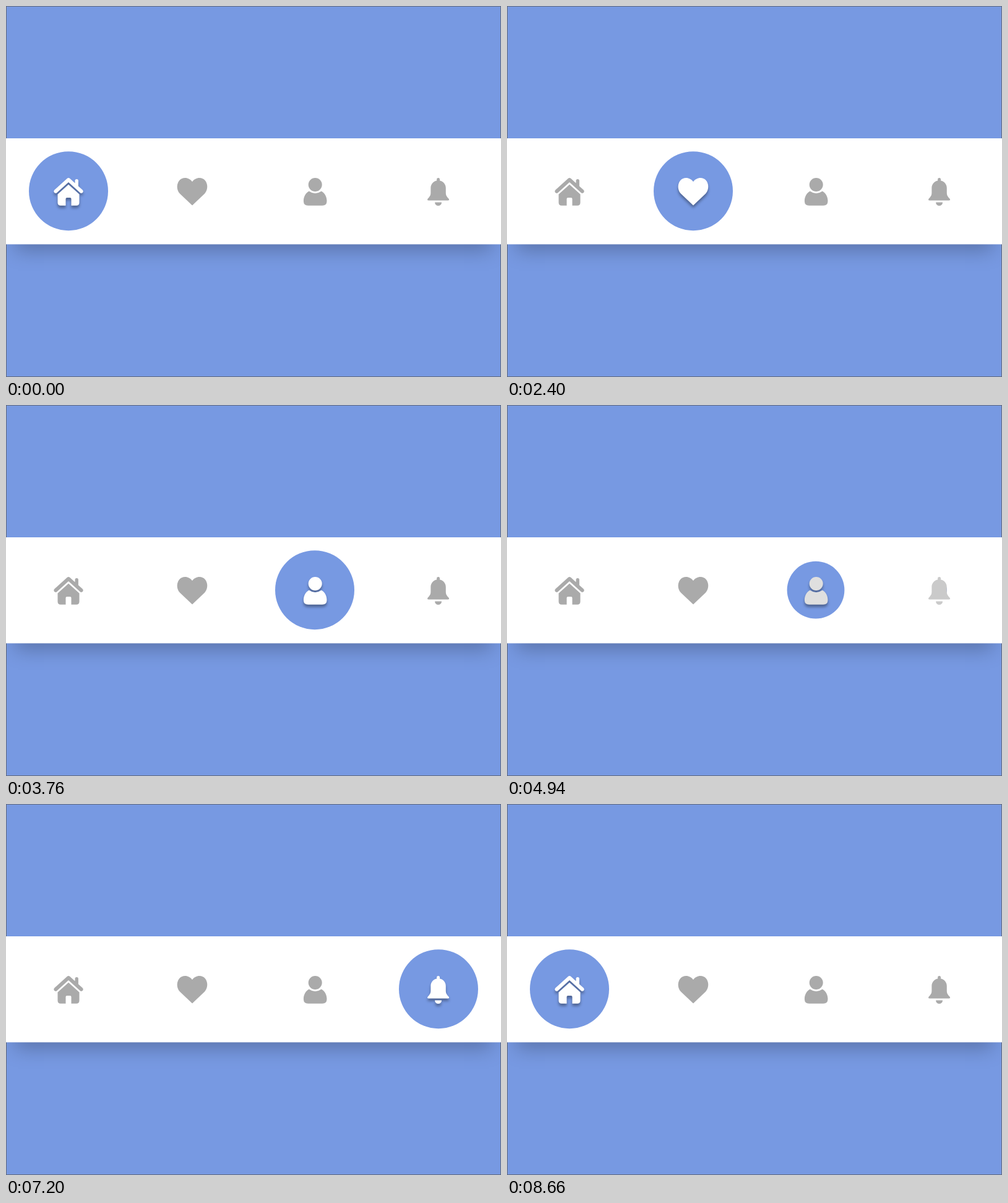
An HTML page with a canvas for the animation above (9.98 s loop, 800 px wide and 600 px high).

```html
<!DOCTYPE html>
<html lang="en">
<head>
<meta charset="utf-8">
<title>Tab bar</title>
<style>
  html, body { margin: 0; width: 100%; height: 100%; overflow: hidden; }
  canvas { display: block; }
</style>
</head>
<body>
<canvas id="stage" width="800" height="600"></canvas>
<script>
const ctx = document.getElementById('stage').getContext('2d');
const LOOP = 9980;
const LANDING = 440;
const BLUE = '#7799e2';

// Icon outlines are relative to the tab centre.
const tabs = [
  { x: 101, y: 300, cx: 101, shape: new Path2D(
    'M-23-2.2L-2-21.2A3 3 0 0 1 2-21.2L23-2.2A3 3 0 0 1 19 2.2L0-15L-19 2.2A3 3 0 0 1-23-2.2Z' +
    'M10.5-17.2a2.7 2.7 0 0 1 5.4 0V-8.4L10.5-13.3Z' +
    'M0-11.2L17.5 4.6V18q0 4.8-4.8 4.8H4.5V12q0-2-2-2h-5q-2 0-2 2V22.8H-12.7q-4.8 0-4.8-4.8V4.6Z') },
  { x: 301, y: 300, cx: 301, shape: new Path2D(
    'M0 22.5L-20 3.5C-27-4-25-17-17-20.8C-10.5-23.6-4-21 0-15.8C4-21 10.5-23.6 17-20.8C25-17 27-4 20 3.5Z') },
  { x: 499.7, y: 300, cx: 499, shape: new Path2D(
    'M-11-11a11 11 0 0 1 22 0a11 11 0 0 1-22 0Z' +
    'M-10-.5Q0 6.5 10-.5C15.5 2 18.8 9 18.8 15.5Q18.8 22.8 11.5 22.8H-11.5Q-18.8 22.8-18.8 15.5C-18.8 9-15.5 2-10-.5Z') },
  { x: 698.6, y: 300.5, cx: 699, shape: new Path2D(
    'M-2.5-20a2.5 2.5 0 0 1 5 0V-18C8.5-16.8 12.2-12 12.2-6V1.5C12.2 6 14 8 16.8 11Q18.8 14 15.5 14H-15.5' +
    'Q-18.8 14-16.8 11C-14 8-12.2 6-12.2 1.5V-6C-12.2-12-8.5-16.8-2.5-18Z' +
    'M-5.5 17H5.5a5.5 5.5 0 0 1-11 0Z') },
];

const moves = [
  { from: 0, to: 1, start: 20, end: 980 },
  { from: 1, to: 2, start: 2700, end: 3680 },
  { from: 2, to: 3, start: 4800, end: 5620 },
  { from: 3, to: 0, start: 7720, end: 8660 },
];

const clamp = v => Math.min(1, Math.max(0, v));
const easeInOut = v => v < 0.5 ? 2 * v * v : 1 - 2 * (1 - v) ** 2;

function drawIcon(tab, white, { alpha = 1, scale = 1, shadow = 0 } = {}) {
  const level = Math.round(170 + 85 * white);
  ctx.save();
  ctx.globalAlpha = alpha;
  ctx.translate(tab.x, tab.y);
  ctx.scale(scale, scale);
  ctx.shadowColor = `rgba(0,0,0,${0.35 * clamp(shadow)})`;
  ctx.shadowOffsetY = 4;
  ctx.shadowBlur = 4;
  ctx.fillStyle = `rgb(${level},${level},${level})`;
  ctx.fill(tab.shape);
  ctx.restore();
}

function drawCircle(tab, size) {
  ctx.fillStyle = BLUE;
  ctx.beginPath();
  ctx.arc(tab.cx, 299.2, 64 * size, 0, 2 * Math.PI);
  ctx.fill();
}

function drawBackdrop() {
  ctx.fillStyle = BLUE;
  ctx.fillRect(0, 0, 800, 600);
  ctx.strokeStyle = '#626a7c';
  ctx.strokeRect(0.5, 0.5, 799, 599);

  // Narrower block under the bar casts the soft shadow.
  ctx.save();
  ctx.shadowColor = 'rgba(0,0,0,.25)';
  ctx.shadowBlur = 30;
  ctx.shadowOffsetY = 25;
  ctx.fillStyle = '#fff';
  ctx.fillRect(15, 229, 770, 141);
  ctx.restore();
  ctx.fillStyle = '#fff';
  ctx.fillRect(0, 214, 800, 171.4);
}

function draw(time) {
  if (time < moves[0].start) time += LOOP;
  const move = moves.filter(m => m.start <= time).pop();
  const elapsed = time - move.start;
  const opening = move.end - LANDING - move.start;
  const tint = clamp(elapsed / opening);
  const landing = clamp((elapsed - opening) / LANDING);
  const previous = tabs[move.from], next = tabs[move.to];

  drawBackdrop();
  drawCircle(previous, 1 - easeInOut(tint));
  drawCircle(next, easeInOut(clamp(elapsed / (opening + 80))));

  for (const tab of tabs) {
    if (tab === previous) {
      drawIcon(tab, 1 - tint, { shadow: 1 - landing / 0.4 });
    } else if (tab === next) {
      // The small icon fades while a large copy shrinks into its place.
      drawIcon(tab, tint, { alpha: 1 - landing });
      drawIcon(tab, 1, {
        alpha: landing,
        scale: 1 + 1.25 * (1 - landing ** 1.75),
        shadow: landing * 2 - 1,
      });
    } else {
      drawIcon(tab, 0);
    }
  }
}

const began = performance.now();
function tick() {
  draw((performance.now() - began) % LOOP);
  requestAnimationFrame(tick);
}
tick();
</script>
</body>
</html>
```
